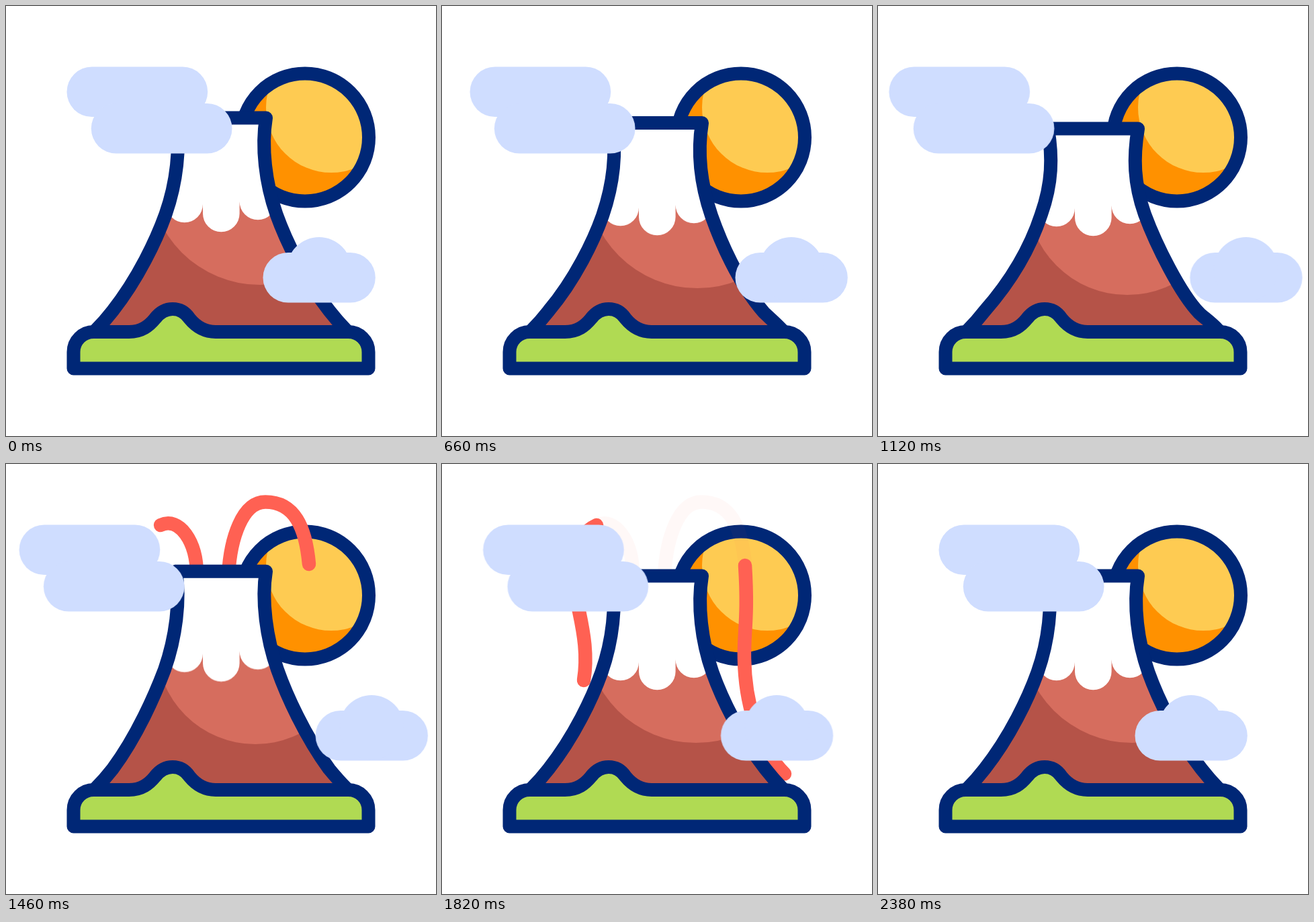
Recreate the animation shown at these times as an HTML page. Size 640 by 640 pixels, loop 2400 ms.

```html
<!DOCTYPE html>
<html lang="en">
<head>
<meta charset="utf-8">
<title>Volcano</title>
<style>
  html, body { margin: 0; width: 100%; height: 100%; overflow: hidden; background: #fff; }
  svg { display: block; width: 100vw; height: 100vh; }

  .line { fill: none; stroke: #002776; stroke-width: 20; stroke-linecap: round; stroke-linejoin: round; }
  .cloud { fill: #cfddff; }
  .arc, .trail { fill: none; stroke: #ff6153; stroke-width: 20.5; stroke-linecap: round; stroke-dasharray: 1 2; }

  .left, .right, .hill, .snow, .light, .arc, .trail { animation: 2400ms linear infinite; }
  .left { animation-name: drift-left; }
  .right { animation-name: drift-right; }
  .hill { animation-name: squash; }
  .snow { animation-name: snow; }
  .light { animation-name: light; }
  .arc { animation-name: spout; }
  .trail { animation-name: fall; }

  @keyframes drift-left {
    0% { transform: translateX(0); animation-timing-function: cubic-bezier(.7, 0, .3, 1); }
    50% { transform: translateX(-74.4px); animation-timing-function: cubic-bezier(.7, 0, .3, 1); }
    98.6%, 100% { transform: translateX(0); }
  }
  @keyframes drift-right {
    0% { transform: translateX(0); animation-timing-function: cubic-bezier(.7, 0, .3, 1); }
    50% { transform: translateX(82px); animation-timing-function: cubic-bezier(.7, 0, .3, 1); }
    98.6%, 100% { transform: translateX(0); }
  }

  /* rest, sinking, squashed, stretched, rest */
  @keyframes squash {
    0%, 20.8%, 68.3%, 100% {
      d: path("M134,482 C142.7,473.2 151,463.7 158.7,453.8 C196.7,405.6 223.8,348.2 237.5,310 C254,263 260,210 253,166.5 H387 C380,210 386,263 402.5,310 C416.2,348.2 443.3,405.6 481.3,453.8 C489,463.7 497.3,473.2 506,482");
    }
    20.8% { animation-timing-function: ease-in; }
    27.5% {
      d: path("M134,482 C142.7,473.2 151,463.7 158.7,453.8 C198,407 226,349 239,312 C255,265 260,217 253,174 H387 C380,217 385,265 401,312 C414,349 440,411 479,456 C486,463 497,472 506,482");
      animation-timing-function: ease-out;
    }
    41.7%, 48.3% {
      d: path("M134,482 C142.7,473.2 151,463.7 158.7,453.8 C200,407 228,356 243,310 C259.5,263 260,225 253,182.5 H387 C380,225 380.5,263 397,310 C414,356 450,428 478,457 C484,463 496,471 506,482");
    }
    48.3% { animation-timing-function: ease-in-out; }
    60.8% {
      d: path("M134,482 C142.7,473.2 151,463.7 158.7,453.8 C195,405 222,343 236,306 C252.5,259 260,203 253,159.7 H387 C380,203 387.5,259 404,306 C417,343 445,405 481,454 C489,463.7 497.3,473.2 506,482");
      animation-timing-function: ease-in-out;
    }
  }
  @keyframes snow {
    0%, 20.8%, 68.3%, 100% { transform: translateY(0); }
    20.8% { animation-timing-function: ease-in; }
    27.5% { transform: translateY(5px); animation-timing-function: ease-out; }
    41.7%, 48.3% { transform: translateY(6px); }
    48.3% { animation-timing-function: ease-in-out; }
    60.8% { transform: translateY(-12.5px); animation-timing-function: ease-in-out; }
  }
  @keyframes light {
    0%, 20.8%, 68.3%, 100% { cx: 378px; cy: 250.5px; r: 164.6px; }
    20.8% { animation-timing-function: ease-in; }
    27.5% { cx: 380px; cy: 255px; r: 165px; animation-timing-function: ease-out; }
    41.7%, 48.3% { cx: 371px; cy: 281px; r: 149px; }
    48.3% { animation-timing-function: ease-in-out; }
    60.8% { cx: 371px; cy: 270px; r: 147px; animation-timing-function: ease-in-out; }
  }

  @keyframes spout {
    0%, 49.9% { stroke-dashoffset: 1; opacity: 0; }
    50% { stroke-dashoffset: 1; opacity: 1; }
    60%, 64% { stroke-dashoffset: 0; opacity: 1; }
    76.4%, 100% { stroke-dashoffset: 0; opacity: 0; }
  }
  @keyframes fall {
    0%, 60.9% { stroke-dashoffset: 1; opacity: 0; }
    61% { stroke-dashoffset: 1; opacity: 1; }
    75%, 79% { stroke-dashoffset: 0; opacity: 1; }
    96%, 100% { stroke-dashoffset: 0; opacity: 0; }
  }
</style>
</head>
<body>
<svg viewBox="0 0 640 640">
  <defs>
    <clipPath id="slopes"><path class="hill"/></clipPath>
    <clipPath id="disc"><circle cx="445" cy="195.5" r="95"/></clipPath>
  </defs>

  <g clip-path="url(#disc)">
    <circle cx="445" cy="195.5" r="95" fill="#ff9100"/>
    <circle cx="484" cy="151" r="97" fill="#fecb52"/>
  </g>
  <circle class="line" cx="445" cy="195.5" r="95"/>

  <path class="arc" pathLength="1" d="M284,165 C284,115 258,78 230,91"/>
  <path class="arc" pathLength="1" d="M331,165 C334,110 352,56.5 386,56.5 C430,56.5 446,95 451,149"/>
  <path class="trail" pathLength="1" d="M230,91 C185,112 193,170 204,219 C211,252 217,285 211,322"/>
  <path class="trail" pathLength="1" d="M451,151 C456,230 449,250 450,290 C451,350 468,420 510,461"/>

  <g clip-path="url(#slopes)">
    <rect x="120" y="140" width="400" height="350" fill="#b55348"/>
    <circle class="light" fill="#d66d5e"/>
    <path class="snow" fill="#fff" d="M238.4,100 V295 A27.3,27.3 0 0 0 293,295 V309 A27.3,27.3 0 0 0 347.6,309 V291 A27.3,27.3 0 0 0 402.2,291 V100 Z"/>
  </g>
  <path class="hill line"/>

  <path class="line" style="fill:#b0da53" d="M100.5,539.5 V515 A30,30 0 0 1 130.5,485 H183 C202,485 213,476 222,465 C229,456 237,451 248,451 C259,451 267,456 273,465 C282,476 294,485 312,485 H509.5 A30,30 0 0 1 539.5,515 V539.5 Z"/>

  <g class="cloud left">
    <rect x="90.5" y="90.5" width="209.7" height="74.6" rx="37.3"/>
    <rect x="126.8" y="145" width="209.7" height="74.6" rx="37.3"/>
  </g>
  <g class="cloud right">
    <rect x="382.5" y="367" width="167.3" height="74.6" rx="37.3"/>
    <circle cx="466" cy="392" r="48"/>
  </g>
</svg>
</body>
</html>
```
